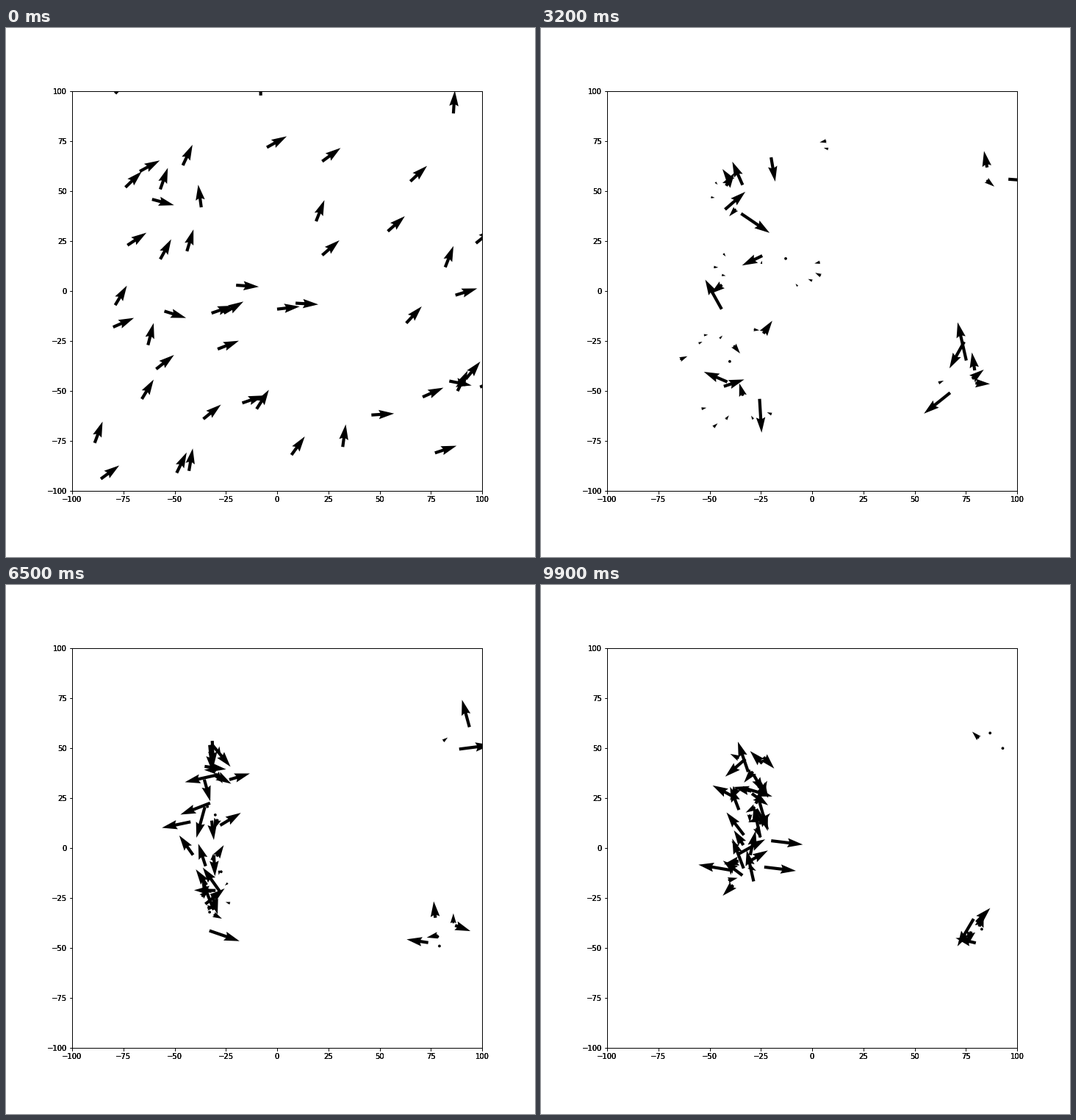
These frames come from a looping animation (720 by 720 pixels, 10000 ms). A matplotlib script:

```python
import numpy as np
import matplotlib.pyplot as plt
from matplotlib.animation import FuncAnimation

FRAMES, STEP_MS = 100, 100
LIM = 100

# Where the flock starts, in axis units
START = np.array([
    (-79, 99), (-8, 98), (86, 89), (-5, 72), (22, 65), (-67, 60), (-46, 63),
    (-74, 52), (-57, 51), (-61, 46), (-37, 42), (65, 55), (19, 35), (54, 30),
    (-73, 23), (-57, 16), (-44, 20), (97, 24), (22, 18), (82, 12), (87, -2),
    (-20, 3), (-79, -7), (-80, -18), (-55, -10), (-32, -11), (-26, -11),
    (0, -9), (9, -6), (63, -16), (-63, -27), (-59, -39), (-29, -29),
    (-66, -54), (-89, -76), (-86, -94), (-49, -91), (-43, -90), (-36, -64),
    (-17, -56), (-10, -59), (7, -82), (32, -78), (46, -62), (71, -53),
    (77, -81), (84, -45), (92, -44), (88, -50), (99, -48),
], float)

# Gathering points: six on the left that merge into a column, two on the right
LEFT = np.array([(5, 78), (-48, 56), (0, 10), (-42, 16), (-45, -22), (-40, -65)], float)
RIGHT = np.array([(77, -40), (88, 55)], float)


def wrap(p):
    return (p + LIM) % (2 * LIM) - LIM


def hubs_at(t):
    ease = np.interp(t, [12, 47], [0, 1])
    top, low = np.interp(t, [47, 99], [58, 46]), np.interp(t, [47, 99], [-38, -14])
    column = np.column_stack([np.full(6, -31), np.linspace(top, low, 6)])
    return np.vstack([LEFT + ease * (column - LEFT), RIGHT])


def simulate():
    """Glide to a stop, drift to the nearest hub, then swarm around it."""
    rng = np.random.default_rng(11)
    n = len(START)
    heading = np.radians(rng.normal(46, 33, n))
    pos = START
    vel = 5 * np.column_stack([np.cos(heading), np.sin(heading)])

    gap = wrap(pos + 4 * vel)[:, None] - hubs_at(0)[None]
    home = np.hypot(gap[..., 0], gap[..., 1]).argmin(axis=1)
    offset = rng.normal(0, 2.5, (n, 2))
    wait = rng.uniform(0, 14, n)
    awake = np.zeros(n, bool)

    states = []
    for t in range(FRAMES):
        states.append((pos, vel))
        pull = wrap(hubs_at(t)[home] + offset - pos)
        awake |= np.hypot(*pull.T) < 14
        kick = rng.normal(0, 2.4, (n, 2))
        rest = rng.random(n) < 0.1

        gain = np.where(awake, 0.45, np.where(t > wait, 0.01, 0))
        vel = 0.8 * vel + gain[:, None] * pull + awake[:, None] * kick
        vel[rest & awake] *= 0.1
        limit = np.interp(t, [32, 47], [8.6, 7])
        speed = np.maximum(np.hypot(*vel.T), 1e-9)
        vel = vel * np.minimum(1, limit / speed)[:, None]
        pos = wrap(pos + vel)
    return states


STATES = simulate()

plt.rcParams.update({"font.family": "DejaVu Sans", "font.size": 10})
fig = plt.figure(figsize=(10, 10), dpi=72, facecolor="white")

# Stacked axes give the heavy tick labels
ticks = np.arange(-LIM, LIM + 1, 25)
for layer in range(3):
    ax = fig.add_axes([0.125, 0.125, 0.775, 0.755], label=f"layer{layer}")
    ax.patch.set_visible(False)
    ax.set(xlim=(-LIM, LIM), ylim=(-LIM, LIM), xticks=ticks, yticks=ticks)

pos0, vel0 = STATES[0]
arrows = ax.quiver(*pos0.T, *vel0.T, color="black", width=0.0075,
                   scale=90, scale_units="width")


def update(i):
    pos, vel = STATES[i]
    arrows.set_offsets(pos)
    arrows.set_UVC(*vel.T)
    return (arrows,)


anim = FuncAnimation(fig, update, frames=FRAMES, interval=STEP_MS,
                     repeat=True, repeat_delay=0, blit=False)
plt.show()
```
